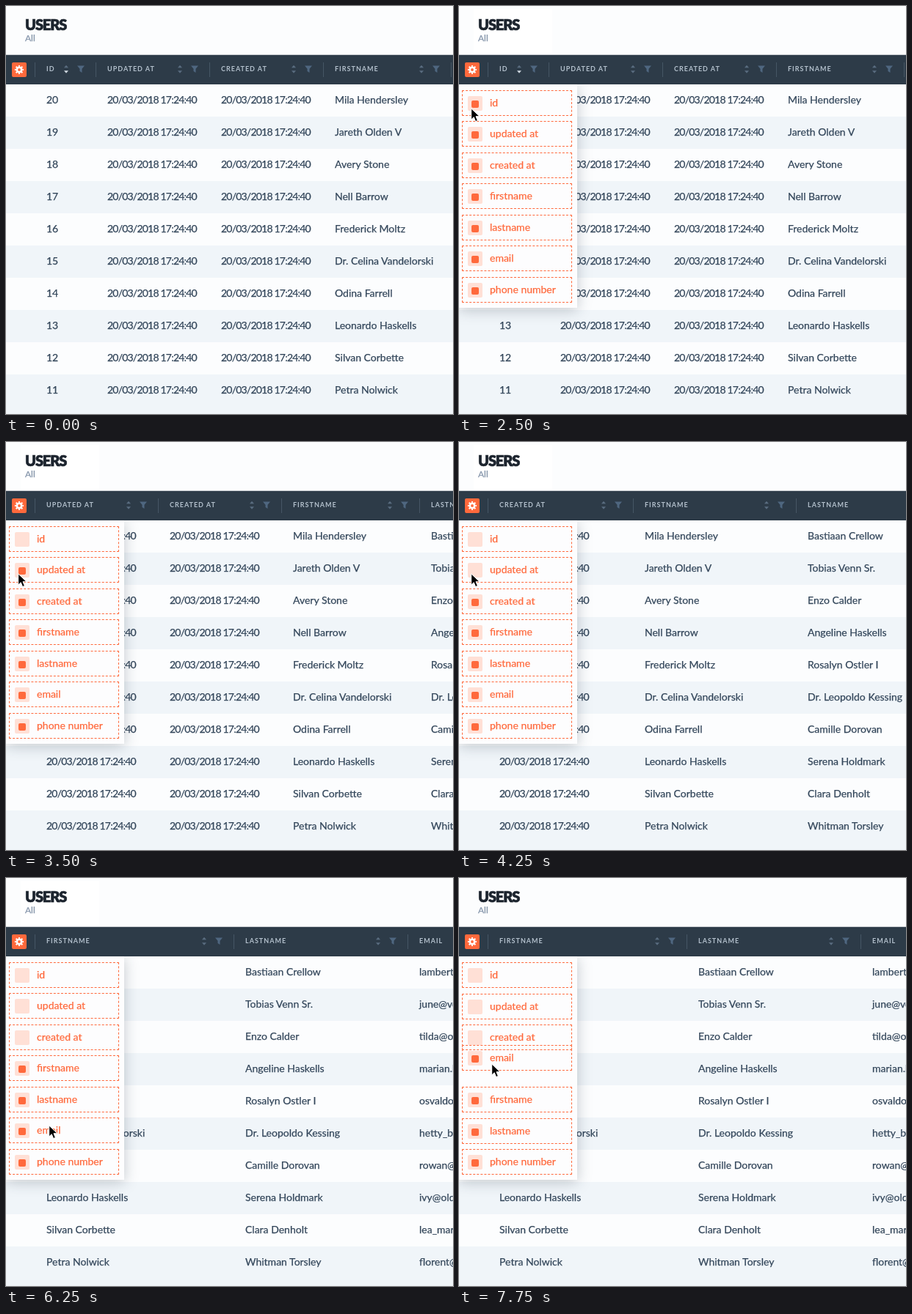
Recreate the animation shown at these times as an HTML page. Size 609 by 557 pixels, loop 8000 ms.

```html
<!DOCTYPE html>
<html lang="en">
<head>
<meta charset="utf-8">
<title>Users</title>
<style>
:root { --orange: #ff693c; --loop: 8s step-end infinite; }
html, body { margin: 0; width: 100%; height: 100%; overflow: hidden; }
body { position: relative; background: #fcfdfe; font: 14px/42px Lato, sans-serif; color: #33465a; white-space: nowrap; -webkit-text-stroke: .25px; }
body * { position: absolute; box-sizing: border-box; }

#patch { left: 20px; top: 4px; width: 107px; height: 62px; background: #fff; opacity: 0; animation: patch var(--loop); }
h1 { left: 26px; top: 13px; margin: 0; font-size: 20px; font-weight: 900; line-height: 24px; letter-spacing: -1.1px; color: #1c242e; -webkit-text-stroke: .6px; }
h2 { left: 26px; top: 36px; margin: 0; font-size: 12px; font-weight: 400; line-height: 16px; color: #8494aa; }

#stripes { left: 0; top: 107px; width: 609px; height: 450px;
  background: linear-gradient(#fcfdfe 50%, #f0f5f9 50%) 0 0 / 100% 88px; }
#stripes::after { content: ""; position: absolute; left: 0; top: 440px; width: 100%; height: 10px; background: #f0f5f9; }
.body { left: 0; top: 107px; width: 609px; height: 450px; overflow: hidden; }
.date { letter-spacing: -.79px; }
#bar, .head { left: 0; top: 67px; width: 609px; height: 40px; overflow: hidden; }
#bar { background: #2d3b48; box-shadow: 0 -1px rgba(45, 59, 72, .25); }
.col { top: 0; height: 40px; }
.col::before { content: ""; position: absolute; left: 0; top: 10px; width: 1px; height: 20px; background: #465665; }
.col b { left: 16px; top: 0; font-size: 9px; line-height: 37px; letter-spacing: 1px; color: #b3c0cc; -webkit-text-stroke: 0; }
.col svg { right: 0; top: 0; width: 46px; height: 40px; }
#gear { left: 8px; top: 77px; width: 20px; height: 20px; border-radius: 2px; background: var(--orange); }

.v0, .v1, .v2, .v3 { opacity: 0; }
.body.v0 { animation: body0 var(--loop); }
.body.v1 { animation: body1 var(--loop); }
.head.v0 { animation: head0 var(--loop); }
.head.v1 { animation: head1 var(--loop); }
.v2 { animation: view2 var(--loop); }
.v3 { animation: view3 var(--loop); }

#menu { left: 0; top: 107px; width: 161px; height: 305px; background: #fdfdfe; opacity: 0;
  box-shadow: 0 3px 18px rgba(30, 45, 60, .26); animation: menu var(--loop); }
.item { left: 4px; width: 150px; height: 35px; border: 1px dashed var(--orange); color: var(--orange); line-height: 32px; }
.item span { left: 37px; top: 0; }
.item i { left: 7px; top: 7px; width: 20px; height: 20px; border-radius: 2px; background: #ffe0d6; }
.item u { left: 5px; top: 6px; width: 10px; height: 10px; border-radius: 2px; background: var(--orange); }
.id u { animation: off-id var(--loop); }
.updated u { animation: off-updated var(--loop); }
.created u { animation: off-created var(--loop); }
.updated { animation: nudge var(--loop); }
.firstname, .lastname { animation: make-room var(--loop); }
.email { animation: drag var(--loop); }

#cursor { left: 0; top: 0; width: 14px; height: 20px; opacity: 0; animation: cursor var(--loop); }

@keyframes patch { 9.375% { opacity: 1 } 93.75% { opacity: 0 } }
@keyframes body0 { 0% { opacity: 1 } 37.5% { opacity: 0 } }
@keyframes head0 { 0% { opacity: 1 } 40.625% { opacity: 0 } }
@keyframes body1 { 37.5% { opacity: 1 } 53.125% { opacity: 0 } }
@keyframes head1 { 40.625% { opacity: 1 } 53.125% { opacity: 0 } }
@keyframes view2 { 53.125% { opacity: 1 } 68.75% { opacity: 0 } }
@keyframes view3 { 68.75%, 100% { opacity: 1 } }
@keyframes menu { 25%, 100% { opacity: 1 } }
@keyframes off-id { 40.625%, 100% { opacity: 0 } }
@keyframes off-updated { 53.125%, 100% { opacity: 0 } }
@keyframes off-created { 68.75% { opacity: .4 } 71.875%, 100% { opacity: 0 } }
@keyframes nudge { 90.625%, 100% { transform: translateY(1px) } }
@keyframes make-room { 90.625%, 100% { transform: translateY(43px) } }
@keyframes drag {
  90.625% { transform: translateY(-75px) }
  93.75% { transform: translateY(-90px) }
  96.875%, 100% { transform: translateY(-99px) }
}
@keyframes cursor {
  0% { opacity: 0 }
  6.25% { opacity: 1; transform: translate(112px, 6px) }
  9.375% { opacity: 1; transform: translate(21px, 86px) }
  12.5% { opacity: 1; transform: translate(17px, 84px) }
  21.875% { opacity: 1; transform: translate(15px, 91px) }
  28.125% { opacity: 1; transform: translate(14px, 121px) }
  31.25% { opacity: 1; transform: translate(16px, 139px) }
  40.625% { opacity: 1; transform: translate(14px, 169px) }
  43.75% { opacity: 1; transform: translate(16px, 179px) }
  56.25% { opacity: 1; transform: translate(15px, 183px) }
  59.375% { opacity: 1; transform: translate(16px, 201px) }
  62.5% { opacity: 1; transform: translate(16px, 216px) }
  65.625% { opacity: 1; transform: translate(17px, 219px) }
  75% { opacity: 1; transform: translate(27px, 244px) }
  78.125% { opacity: 1; transform: translate(58px, 337px) }
  81.25% { opacity: 1; transform: translate(55px, 351px) }
  84.375% { opacity: 1; transform: translate(57px, 354px) }
  90.625% { opacity: 1; transform: translate(45px, 277px) }
  93.75% { opacity: 1; transform: translate(44px, 262px) }
  96.875%, 100% { opacity: 1; transform: translate(44px, 253px) }
}
</style>
</head>
<body>
<div id="patch"></div>
<h1>USERS</h1>
<h2>All</h2>
<div id="stripes"></div>
<div id="bodies"></div>
<div id="menu"></div>
<div id="bar"></div>
<div id="heads"></div>
<svg id="gear" viewBox="0 0 20 20" fill="none" stroke="#fff">
  <circle cx="10" cy="10" r="3.2" stroke-width="2.6"/>
  <circle cx="10" cy="10" r="5.2" stroke-width="1.8" pathLength="16" stroke-dasharray="1 1" stroke-dashoffset=".5"/>
</svg>
<svg id="cursor" viewBox="0 0 14 20">
  <path d="M.7 1V16L4.2 12.7 6.6 18.6 9.4 17.4 7 11.7H12Z" fill="#000" stroke="#fff"/>
</svg>
<script>
const date = '20/03/2018 17:24:40';
const first = ['Mila Hendersley', 'Jareth Olden V', 'Avery Stone', 'Nell Barrow', 'Frederick Moltz',
  'Dr. Celina Vandelorski', 'Odina Farrell', 'Leonardo Haskells', 'Silvan Corbette', 'Petra Nolwick'];
const last = ['Bastiaan Crellow', 'Tobias Venn Sr.', 'Enzo Calder', 'Angeline Haskells', 'Rosalyn Ostler I',
  'Dr. Leopoldo Kessing', 'Camille Dorovan', 'Serena Holdmark', 'Clara Denholt', 'Whitman Torsley'];
const email = ['lambert@plover.example', 'june@velda.example', 'tilda@orrin.example', 'marian.k@orrin.example',
  'osvaldo@velda.example', 'hetty_b@plover.example', 'rowan@velda.example', 'ivy@olden.example',
  'lea_mar@orrin.example', 'florent@plover.example'];

const fields = [
  ['ID', r => 20 - r],
  ['UPDATED AT', () => date],
  ['CREATED AT', () => date],
  ['FIRSTNAME', r => first[r]],
  ['LASTNAME', r => last[r]],
  ['EMAIL', r => email[r]]
];

// Column edges after hiding 0, 1, 2 and 3 leading fields.
const views = [
  [39, 122, 277, 432, 606, 800],
  [39, 207, 375, 563, 780],
  [39, 237, 459, 710],
  [39, 310, 547, 800]
];

const icons = active => `<svg viewBox="0 0 46 40">
  <path d="M3 17.3 6 13.8 9 17.3Z" fill="#5a6d80"/>
  <path d="M3 21.3 6 24.8 9 21.3Z" fill="${active ? '#d3dce4' : '#5a6d80'}"/>
  <path d="M21 14.5H31L27.5 18.8V24L24.5 22V18.8Z" fill="#4f6780"/></svg>`;

const get = id => document.getElementById(id);

views.forEach((edges, v) => {
  let head = '', body = '';
  edges.slice(0, -1).forEach((x, c) => {
    const [name, value] = fields[v + c];
    head += `<div class="col" style="left:${x}px;width:${edges[c + 1] - x}px"><b>${name}</b>${icons(name === 'ID')}</div>`;
    first.forEach((_, r) => {
      const kind = value(r) === date ? ' class="date"' : '';
      body += `<span${kind} style="left:${x + 16}px;top:${r * 44}px">${value(r)}</span>`;
    });
  });
  get('heads').innerHTML += `<div class="head v${v}">${head}</div>`;
  get('bodies').innerHTML += `<div class="body v${v}">${body}</div>`;
});

get('menu').innerHTML = ['id', 'updated at', 'created at', 'firstname', 'lastname', 'email', 'phone number']
  .map((name, i) => `<div class="item ${name.split(' ')[0]}" style="top:${Math.floor(8 + i * 42.5)}px">
    <i><u></u></i><span>${name}</span></div>`).join('');
</script>
</body>
</html>
```
